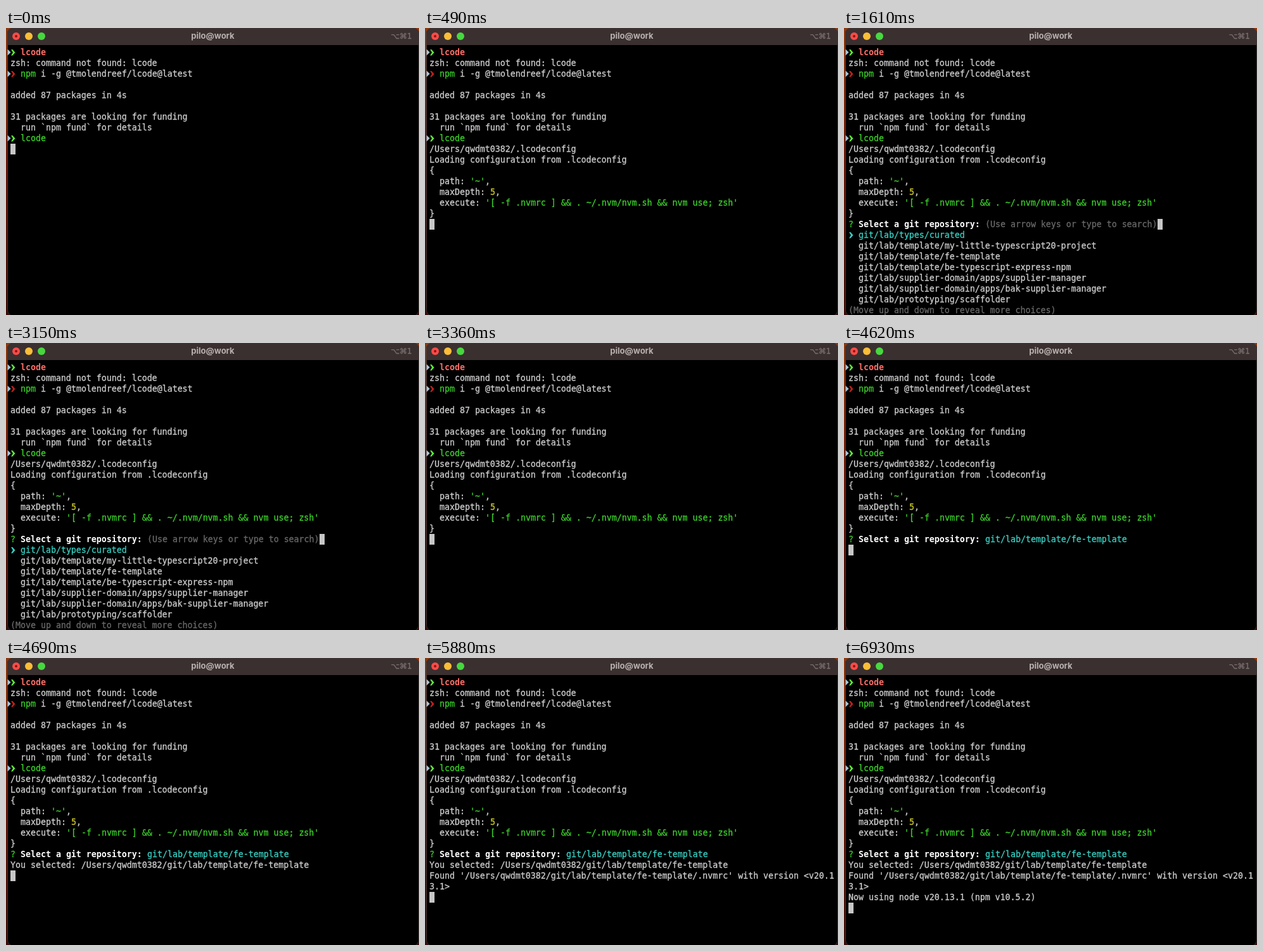
Write an HTML page that moves like this. It is 652 px wide and 454 px high and loops after 8000 ms.

```html
<!DOCTYPE html>
<html lang="en">
<head>
<meta charset="utf-8">
<title>Terminal</title>
<style>
  html, body { margin: 0; width: 100%; height: 100%; overflow: hidden; background: #000; }
  svg { display: block; width: 652px; height: 454px; }
  text { white-space: pre; }
  .cell { font: 13.288px "DejaVu Sans Mono", monospace; fill: currentColor; color: #cdcdcd; stroke: currentColor; stroke-width: .3px; }
  .title { font: 700 13px Inter, sans-serif; fill: #b9b0b0; text-anchor: middle; }
  .keys { font: 12px "DejaVu Sans", Inter, sans-serif; fill: #7b7071; stroke: #7b7071; stroke-width: .3px; text-anchor: end; }
  .cell.red { color: #ff6d67; font-weight: bold; stroke: none; }
  .cell.green { color: #3bd02a; }
  .cell.yellow { color: #cfca2c; }
  .cell.cyan { color: #38cfc2; }
  .cell.gray { color: #686868; }
  .cell.white { color: #fff; font-weight: bold; stroke: none; }
</style>
</head>
<body>
<svg viewBox="0 0 652 454" xmlns="http://www.w3.org/2000/svg">
  <defs>
    <linearGradient id="desk" x2="0" y2="1">
      <stop offset="0" stop-color="#8a3a12"/>
      <stop offset=".5" stop-color="#641506"/>
      <stop offset="1" stop-color="#3a0c06"/>
    </linearGradient>
    <clipPath id="win"><rect x="2" y="0" width="650" height="456" rx="9"/></clipPath>
  </defs>
  <rect width="652" height="454" fill="url(#desk)"/>
  <g clip-path="url(#win)">
    <rect width="652" height="454"/>
    <rect width="652" height="27" fill="#3b3030"/>
  </g>
  <rect x="2.5" y=".5" width="649" height="455" rx="9" fill="none" stroke="#3c3434"/>
  <circle cx="16" cy="13" r="6" fill="#fc4b48"/>
  <circle cx="16" cy="13" r="2" fill="#8a1512"/>
  <circle cx="36" cy="13" r="6" fill="#fabd38"/>
  <circle cx="56" cy="13" r="6" fill="#47d83f"/>
  <text class="title" x="326.5" y="17">pilo@work</text>
  <text class="keys" x="641" y="16.5">⌥⌘1</text>
  <g id="screen"></g>
</svg>
<script>
const LOOP = 8000, CELL = 8, LINE = 17, LEFT = 7, TOP = 30;
const CONFIG = 420, LIST = 560, CLEAR = 3360, REDRAW = 3430, DOWN = 3780,
      PICK = 4620, CHOSEN = 4690, FOUND = 5880, USING = 6860, DONE = 6930;

const screen = document.getElementById('screen');
const timed = [];

function add(tag, attrs, label = '') {
  const el = document.createElementNS('http://www.w3.org/2000/svg', tag);
  for (const name in attrs) el.setAttribute(name, attrs[name]);
  el.textContent = label;
  return screen.appendChild(el);
}

const colX = col => LEFT + col * CELL;
const rowY = row => TOP + row * LINE;

// Visible in every [from, to) span given; none means always.
function during(el, ...spans) {
  if (spans.length) timed.push({ el, spans });
  return el;
}

function write(row, col, label, color = '', ...spans) {
  const el = add('text', { x: colX(col), y: rowY(row) + 13, class: 'cell ' + color }, label);
  return during(el, ...spans);
}

function chevron(row, fill) {
  return add('path', {
    d: 'M8 4h2.4l4.1 4.8-4.1 4.8H8l2.9-4.8z', fill, transform: `translate(0 ${rowY(row)})`
  });
}

function prompt(row, fill) {
  add('path', { d: 'M2.5 3.5l5 5-5 5z', fill: '#a9c8dc', transform: `translate(0 ${rowY(row)})` });
  chevron(row, fill);
}

prompt(0, '#5fe83c');
write(0, 2, 'lcode', 'red');
write(1, 0, 'zsh: command not found: lcode');
prompt(2, '#c4201a');
write(2, 2, 'npm', 'green');
write(2, 6, 'i -g @tmolendreef/lcode@latest');
write(4, 0, 'added 87 packages in 4s');
write(6, 0, '31 packages are looking for funding');
write(7, 2, 'run `npm fund` for details');
prompt(8, '#5fe83c');
write(8, 2, 'lcode', 'green');

const config = [CONFIG, LOOP];
write(9, 0, '/Users/qwdmt0382/.lcodeconfig', '', config);
write(10, 0, 'Loading configuration from .lcodeconfig', '', config);
write(11, 0, '{', '', config);
write(12, 2, 'path:', '', config);
write(12, 8, "'~'", 'green', config);
write(12, 11, ',', '', config);
write(13, 2, 'maxDepth:', '', config);
write(13, 12, '5', 'yellow', config);
write(13, 13, ',', '', config);
write(14, 2, 'execute:', '', config);
write(14, 11, "'[ -f .nvmrc ] && . ~/.nvm/nvm.sh && nvm use; zsh'", 'green', config);
write(15, 0, '}', '', config);

const asked = [[LIST, CLEAR], [REDRAW, LOOP]];
const listed = [[LIST, CLEAR], [REDRAW, PICK]];
write(16, 0, '?', 'green', ...asked);
write(16, 2, 'Select a git repository:', 'white', ...asked);
write(16, 27, '(Use arrow keys or type to search)', 'gray', [LIST, CLEAR]);
const choices = [
  'types/curated',
  'template/my-little-typescript20-project',
  'template/fe-template',
  'template/be-typescript-express-npm',
  'supplier-domain/apps/supplier-manager',
  'supplier-domain/apps/bak-supplier-manager',
  'prototyping/scaffolder'
].map((path, i) => write(17 + i, 2, 'git/lab/' + path, '', ...listed));
const pointer = during(chevron(17, '#38cfc2'), ...listed);
write(24, 0, '(Move up and down to reveal more choices)', 'gray', ...listed);

write(16, 27, 'git/lab/template/fe-template', 'cyan', [PICK, LOOP]);
write(17, 0, 'You selected: /Users/qwdmt0382/git/lab/template/fe-template', '', [CHOSEN, LOOP]);
write(18, 0, "Found '/Users/qwdmt0382/git/lab/template/fe-template/.nvmrc' with version <v20.1", '', [FOUND, LOOP]);
write(19, 0, '3.1>', '', [FOUND, LOOP]);
write(20, 0, 'Now using node v20.13.1 (npm v10.5.2)', '', [USING, LOOP]);

const cursor = add('rect', { width: CELL, height: LINE, fill: '#c7c7c7' });
const cursorStops = [ // time, row, column
  [0, 9, 0], [CONFIG, 16, 0], [LIST, 16, 61], [CLEAR, 16, 0], [REDRAW, 16, 27],
  [PICK, 17, 0], [CHOSEN, 18, 0], [FOUND, 20, 0], [USING, 20, 37], [DONE, 21, 0]
];

function draw(t) {
  for (const { el, spans } of timed) {
    const on = spans.some(([from, to]) => t >= from && t < to);
    el.setAttribute('visibility', on ? 'visible' : 'hidden');
  }
  const selected = t < CLEAR ? 0 : t < DOWN ? 1 : 2;
  choices.forEach((el, i) => el.setAttribute('class', i === selected ? 'cell cyan' : 'cell'));
  pointer.setAttribute('transform', `translate(0 ${rowY(17 + selected)})`);
  const [, row, col] = cursorStops.filter(([at]) => at <= t).pop();
  cursor.setAttribute('x', colX(col));
  cursor.setAttribute('y', rowY(row));
}

const start = performance.now();
function tick() {
  draw((performance.now() - start) % LOOP);
  requestAnimationFrame(tick);
}
tick();
</script>
</body>
</html>
```
